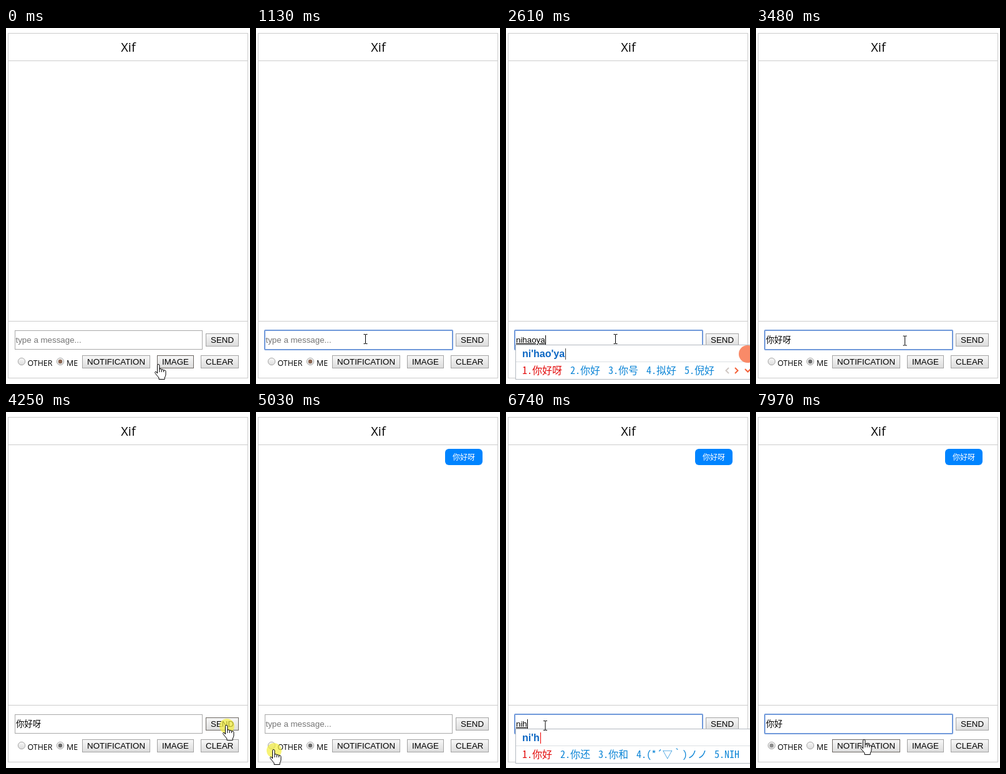
An HTML page for the animation above (8000 ms loop, 391x570 px).

```html
<!DOCTYPE html>
<html lang="zh-CN">
<head>
<meta charset="utf-8">
<style>
html, body { margin: 0; width: 391px; height: 570px; overflow: hidden; background: #fff; }
svg { display: block; }
text { white-space: pre; font: 13.333px Arial, "Liberation Sans", "Noto Sans CJK SC", sans-serif; }
.title { font: 20px "Open Sans", "Noto Sans", sans-serif; }
.label { font: 12.4px "Open Sans", "Noto Sans", sans-serif; }
.bubble { font: 12px "Noto Sans CJK SC", sans-serif; }
.pinyin { font: bold 16px Arial, "Liberation Sans", sans-serif; }
.candidate { font: 300 16px "Noto Sans Mono CJK SC", "Noto Sans CJK SC", monospace; }
</style>
</head>
<body>
<svg id="stage" width="391" height="570"></svg>
<script>
const LOOP = 8000;
const stage = document.getElementById('stage');
const measure = document.createElement('canvas').getContext('2d');
measure.font = '13.333px Arial, "Liberation Sans", "Noto Sans CJK SC", sans-serif';

const buttons = [
  ['SEND', 320, 489, 53], ['NOTIFICATION', 122, 524, 109],
  ['IMAGE', 242, 524, 59], ['CLEAR', 312, 524, 61]
];

// What the field holds from each time on
const typed = [
  [0, ''], [1360, 'n'], [1610, 'ni'], [1760, 'nih'], [1840, 'niha'], [1990, 'nihao'],
  [2390, 'nihaoy'], [2540, 'nihaoya'], [2930, '你好呀'], [4420, ''],
  [6340, 'n'], [6570, 'ni'], [6740, 'nih'], [6890, 'niha'], [7040, 'nihao'], [7270, '你好']
];
const suggestions = {
  n: ['n', '你 年 那 能 呢'],
  ni: ['ni', '你 尼 泥 逆 拟'],
  nih: ["ni'h", '你好 你还 你和 (*´▽｀)ノノ NIH'],
  niha: ["ni'ha", '你哈 你还 你好 尼哈 你海'],
  nihao: ["ni'hao", '你好 你号 拟好 倪好 你好啊'],
  nihaoy: ["ni'hao'y", '你好有 你好 你号 拟好 倪好'],
  nihaoya: ["ni'hao'ya", '你好呀 你好 你号 拟好 倪好']
};
const focusSpans = [[630, 4170], [5690, LOOP]];
const clicks = [[630, 750], [4170, 4420], [5030, 5180], [5640, 5790]];

// Pointer moves: start, end, steps, target x, target y
const moves = [
  [70, 360, 5, 175.5, 498], [3330, 3710, 6, 365, 506], [3940, 4170, 4, 353, 501],
  [4500, 4960, 7, 28, 540], [5330, 5560, 4, 63, 502], [7820, 7970, 3, 173, 524]
];

const rect = (x, y, w, h, attrs) => `<rect x="${x}" y="${y}" width="${w}" height="${h}" ${attrs}/>`;
const text = (x, y, s, attrs = '') => `<text x="${x}" y="${y}" ${attrs}>${s}</text>`;
const path = (d, attrs) => `<path d="${d}" ${attrs}/>`;
const inside = ([px, py], x, y, w, h) => px >= x && px <= x + w && py >= y && py <= y + h;
const during = (spans, t) => spans.find(([a, b]) => t >= a && t < b);

function pointerAt(t) {
  let x = 244, y = 538;
  for (const [start, end, steps, tx, ty] of moves) {
    if (t < start) break;
    const done = Math.floor((t - start) / (end - start) * (steps - 1) + 1e-6) + 1;
    const k = Math.min(1, done / steps);
    x += (tx - x) * k;
    y += (ty - y) * k;
  }
  return [x, y];
}

function drawPointer(p) {
  const [x, y] = p;
  const ink = 'fill="#fff" stroke="#000" stroke-linejoin="round"';
  let shape;
  if (inside(p, 14, 484, 301, 31)) {
    shape = path('M-3-7.5h2.5l.5.5.5-.5H3M0-7V7M-3 7.5h2.5L0 7l.5.5H3', 'fill="none" stroke="#000"');
  } else if (buttons.some(([, bx, by, w]) => inside(p, bx, by, w, 21)) || inside(p, 19, 527, 97, 18)) {
    shape = path('M-1.5 15V2.3q0-1.8 1.7-1.8t1.7 1.8V8q3.3-1 3.4 1q3-1 3.3 1q3-.8 3.4 1.5V17' +
      'q0 2-1.8 5V24.5H1V22L-4 16Q-6.5 12.8-4.2 12.2-3 12-1.5 15Z', ink) +
      path('M1.9 8v5M5.3 9v4M8.6 10v3', 'stroke="#000"');
  } else {
    shape = path('M.5.5V16l3.6-3.4 2.6 5.6 2.4-1-2.5-5.5h4.9Z', ink);
  }
  return `<g transform="translate(${x} ${y})">${shape}</g>`;
}

function drawButton([name, x, y, w], p) {
  const border = inside(p, x, y, w, 21) ? '#6c6762' : '#a3a3a3';
  return rect(x + .5, y + .5, w - 1, 20, `fill="url(#face)" stroke="${border}"`) + text(x + 8, y + 15, name);
}

function drawRadio(x, on, dot) {
  return `<circle cx="${x}" cy="534" r="5.7" fill="url(#face)" stroke="#aaa"/>` +
    (on ? `<circle cx="${x}" cy="534" r="3.2" fill="${dot}"/>` : '');
}

function drawField(t, value, keyTime) {
  const focus = during(focusSpans, t);
  let out = focus
    ? rect(14, 484, 301, 31, 'rx="1" fill="#fff" stroke="#7099da" stroke-width="2"')
    : rect(14.5, 484.5, 300, 30, 'fill="#fff" stroke="#a9a9a9"');
  out += value
    ? text(16, 504, value, suggestions[value] ? 'text-decoration="underline"' : '')
    : text(15.5, 504, 'type a message...', 'fill="#757575"');
  if (focus && Math.floor((t - Math.max(keyTime, focus[0])) / 500) % 2 === 0) {
    out += rect(Math.round(16 + measure.measureText(value).width), 492, 1, 15, '');
  }
  return out;
}

function drawSuggestions(t, [pinyin, words]) {
  let x = 26, list = '';
  words.split(' ').forEach((word, i) => {
    const item = `${i + 1}.${word}`;
    list += text(x, 554, item, `class="candidate" fill="${i ? '#0a84d6' : '#e30b0b'}"`);
    for (const c of item) x += /[ -~´]/.test(c) ? 8 : 16;
    x += 13;
  });
  const end = x - 13;
  measure.save();
  measure.font = 'bold 16px Arial, "Liberation Sans", sans-serif';
  const caret = Math.round(27 + measure.measureText(pinyin).width);
  measure.restore();
  const line = 'fill="none" stroke-width="2" stroke=';
  return rect(15.5, 507.5, end + 53, 55, 'fill="#fff" stroke="#b3b9c0"') +
    rect(16, 534, end + 52, 1, 'fill="#dcdfe3"') +
    text(26, 527, pinyin, 'class="pinyin" fill="#0b66c3"') +
    rect(caret, 513, 1, 18, `fill="${t < 4000 ? '#444' : '#e00'}"`) + list +
    path(`M${end + 23} 544l-4.5 4.5 4.5 4.5`, line + '"#d0c8c4"') +
    path(`M${end + 33} 544l4.5 4.5-4.5 4.5`, line + '"#f4623a"') +
    path(`M${end + 49} 546l4.5 4.5 4.5-4.5`, line + '"#f4623a"') +
    `<circle cx="${end + 53}" cy="522" r="14" fill="#f98a68"/>`;
}

function draw(t) {
  const p = pointerAt(t);
  const [keyTime, value] = typed.filter(([at]) => at <= t).pop();
  const other = t >= 5100;
  const dot = t < 2930 ? '#8a6550' : t < 7270 ? '#6c6c6c' : '#8c8c8c';
  const grey = 'fill="none" stroke="#ccc"';
  let out = '<linearGradient id="face" x2="0" y2="1"><stop stop-color="#f8f8f8"/>' +
    '<stop offset="1" stop-color="#dcdcdc"/></linearGradient>' +
    rect(3.5, 8.5, 384, 552, grey) + path('M4 52.5H387M4 469.5H387', grey) +
    text(196, 38, 'Xif', 'class="title" text-anchor="middle"');
  if (t >= 4420) {
    out += rect(303, 59, 60, 26, 'rx="6" fill="#0084ff"') +
      text(315, 77, '你好呀', 'class="bubble" fill="#fff"');
  }
  out += drawField(t, value, keyTime) + buttons.map(b => drawButton(b, p)).join('') +
    drawRadio(25, other, dot) + text(34.5, 541, 'OTHER', 'class="label"') +
    drawRadio(87, !other, dot) + text(97, 541, 'ME', 'class="label"');
  if (suggestions[value]) out += drawSuggestions(t, suggestions[value]);
  if (during(clicks, t)) {
    out += `<circle cx="${p[0] + 1}" cy="${p[1] + 2}" r="12" fill="#f3ee3c" opacity=".7"/>`;
  }
  return out + drawPointer(p);
}

let shown = '';
function frame() {
  const next = draw(performance.now() % LOOP);
  if (next !== shown) stage.innerHTML = shown = next;
  requestAnimationFrame(frame);
}
frame();
</script>
</body>
</html>
```
